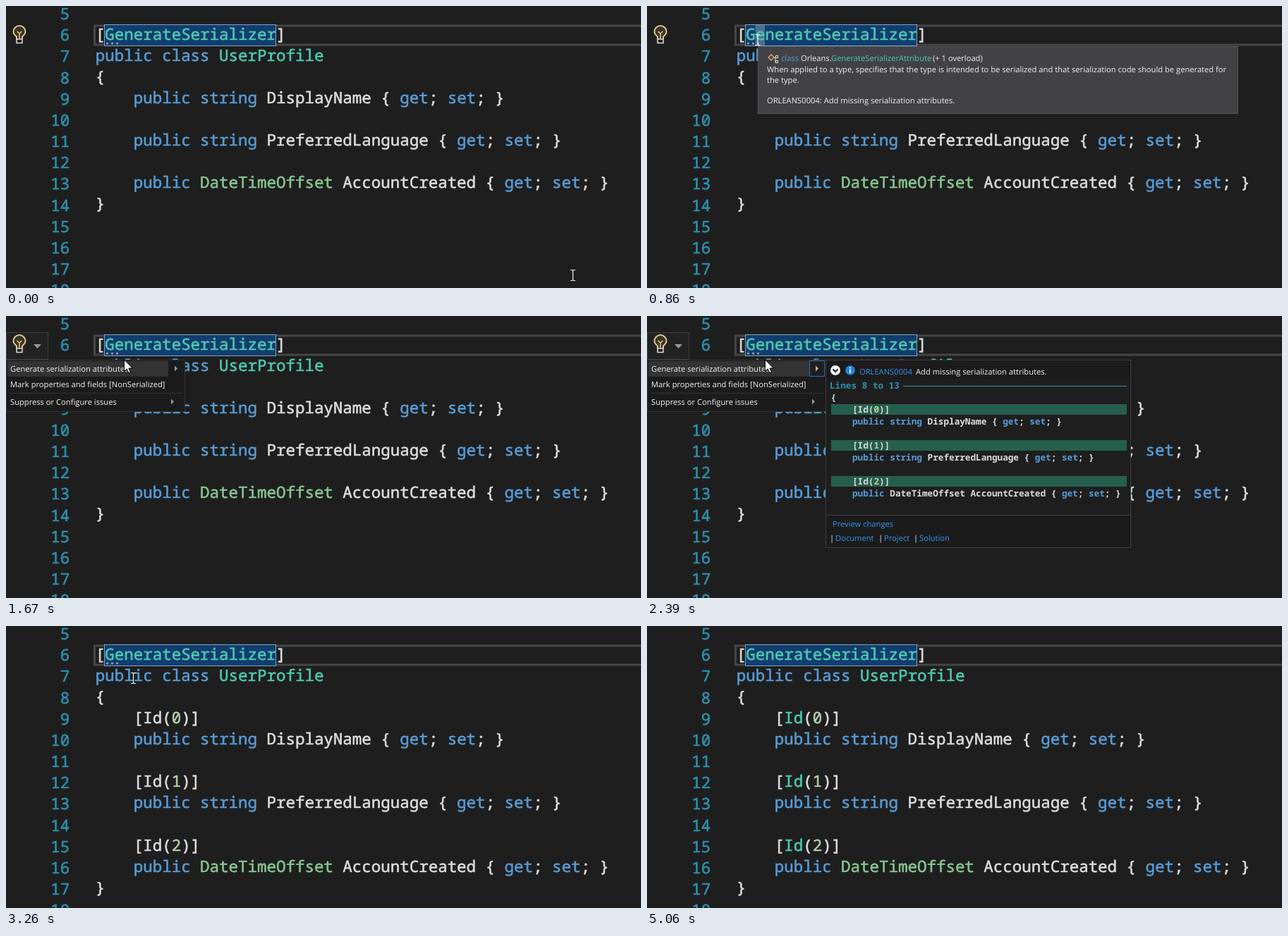
Animation of 900x400 px, one loop 5.13 s. Source, as an HTML page:

```html
<!DOCTYPE html>
<html lang="en">
<head>
<meta charset="utf-8">
<title>Code fix</title>
<style>
html, body { margin: 0; width: 100%; height: 100%; overflow: hidden; background: #1e1e1e; }
svg { display: block; width: 900px; height: 400px; }
text { white-space: pre; text-rendering: geometricPrecision; color: #dcdcdc; }
text, tspan { fill: currentColor; }
.mono { font-family: "Noto Sans Mono", "DejaVu Sans Mono", monospace; font-weight: 500; }
.mono, .mono tspan { stroke: currentColor; stroke-width: .6px; }
.ui { font: 11.18px "Open Sans", "Noto Sans", sans-serif; color: #f1f1f1; }
.key { color: #569cd6; }
.type { color: #4ec9b0; }
.num { color: #b5cea8; }
.id { color: var(--id, #4ec9b0); }
.struct { color: var(--struct, #86c691); }
.line { color: #2b91af; }
.link { color: #2f95ee; }
#preview .mono { font-weight: 600; }
#preview .mono, #preview tspan { stroke: none; }
</style>
</head>
<body>
<svg id="stage" viewBox="0 0 900 400"></svg>
<script>
const FONT = 22.47, LEFT = 126.8, LOOP = 5130;

const plain = `[GenerateSerializer]
public class UserProfile
{
    public string DisplayName { get; set; }

    public string PreferredLanguage { get; set; }

    public DateTimeOffset AccountCreated { get; set; }
}`.split('\n');

// The same class with an [Id(n)] line above each property
let count = 0;
const fixed = plain.flatMap(s => s.startsWith('    ') ? [`    [Id(${count++})]`, s] : [s]);

const kinds = [
  ['key', /^(public|class|string|get|set)$/],
  ['type', /^(GenerateSerializer|UserProfile)$/],
  ['struct', /^DateTimeOffset$/],
  ['id', /^Id$/],
  ['num', /^\d+$/],
];
const paint = s => s.replace(/\w+/g, word => {
  const kind = kinds.find(k => k[1].test(word));
  return kind ? `<tspan class="${kind[0]}">${word}</tspan>` : word;
});

const rect = (x, y, w, h, fill, stroke = 'none') =>
  `<rect x="${x}" y="${y}" width="${w}" height="${h}" fill="${fill}" stroke="${stroke}"/>`;
const path = (d, fill, stroke = 'none', w = 1) =>
  `<path d="${d}" fill="${fill}" stroke="${stroke}" stroke-width="${w}"/>`;
const ui = (x, y, s, cls = '') => `<text class="ui ${cls}" x="${x}" y="${y}">${s}</text>`;
const mono = (x, y, size, s, extra = '') =>
  `<text class="mono" font-size="${size}" x="${x}" y="${y}" ${extra}>${s}</text>`;
const group = (id, body) => `<g id="${id}">${body}</g>`;
const code = lines => lines.map((s, i) => mono(LEFT, 47.6 + 30.1 * i, FONT, paint(s))).join('');

const bulb = (x, y) => `<g transform="translate(${x} ${y})">` +
  path('M-4 8V4.5C-7 2-8.5 0-8.5-2.5A8.5 8.5 0 0 1 8.5-2.5C8.5 0 7 2 4 4.5V8', '#3a3526', '#dcc68a', 2) +
  path('M0 7V0M-3.5-3L0 0L3.5-3', 'none', '#dcc68a', 1.6) +
  path('M-4 8H4V13.5H-4Z', 'none', '#d8d8d8', 1.6) + '</g>';
const bulbButton = (x, y) => rect(x + .5, y + .5, 59, 38, '#222223', '#3f3f46') +
  bulb(x + 19, y + 15) + path(`M${x + 39} ${y + 17}h11l-5.5 6z`, '#999');

const numbers = Array.from({ length: 14 }, (_, i) =>
  mono(90.2, 49.3 + 30.15 * (i - 1), FONT, `<tspan class="line">${i + 5}</tspan>`, 'text-anchor="end"')).join('');

const dots = [143.5, 150.5, 157.5].map(x => `<circle cx="${x}" cy="53" r="1.6" fill="#a0a0a0"/>`).join('');

const tooltip = rect(157.5, 57.5, 680, 95, '#424245', '#555558') +
  path('M172 73l4-4 4 4-4 4zM180 73h5M182 73v6h3', 'none', '#d2b27c', 1.4) +
  rect(182.5, 70.5, 3, 3, '#424245', '#ddd') + rect(182.5, 77.5, 3, 3, '#424245', '#ddd') +
  ui(190, 78, 'class', 'key') + ui(218, 78, 'Orleans.') +
  ui(261, 78, 'GenerateSerializerAttribute', 'type') + ui(405, 78, '(+ 1 overload)') +
  ui(170, 94, 'When applied to a type, specifies that the type is intended to be serialized and that serialization code should be generated for') +
  ui(170, 109, 'the type.') +
  ui(170, 138, 'ORLEANS0004: Add missing serialization attributes.');

const menu = bulbButton(0, 23) + rect(.5, 62.5, 253, 73, '#1b1b1c', '#333337') +
  rect(2, 64, 228, 22, '#333334') +
  ui(6, 79, 'Generate serialization attributes.') +
  ui(6, 101, 'Mark properties and fields [NonSerialized]') +
  ui(6, 126, 'Suppress or Configure issues') +
  path('M6 109.5H250', 'none', '#333337') +
  path('M239 70.5v8l4-4z', '#999') + path('M234 117.5v8l4-4z', '#999');

const preview = rect(230.5, 63.5, 21, 22, '#1f1f20', '#2373b0') + path('M239 70.5v8l4-4z', '#bbb') +
  rect(253.5, 62.5, 432, 266, '#1b1b1c', '#3f3f46') + rect(256, 90, 428, 192, '#1e1e1e') +
  '<circle cx="267" cy="77" r="7" fill="#f1f1f1"/>' + path('M263.5 75.5l3.5 3.5 3.5-3.5', 'none', '#1b1b1c', 2) +
  '<circle cx="288" cy="77" r="6.8" fill="#2186e0"/>' + path('M288 75.5v5.5M288 72.5v1.8', 'none', '#fff', 1.8) +
  ui(301, 82.5, 'ORLEANS0004', 'link') + ui(381, 82.5, 'Add missing serialization attributes.') +
  mono(259, 103, 12.69, '<tspan class="line">Lines 8 to 13</tspan>') + path('M363 99.5H680', 'none', '#2b91af') +
  [125, 176, 227].map(y => rect(261, y, 419, 15, '#265e4d')).join('') +
  fixed.slice(2, -1).map((s, i) => mono(260.5, 119.5 + 17.05 * i, 12.69, paint(s))).join('') +
  path('M254 282.5H685', 'none', '#3f3f46') +
  ui(263, 299, 'Preview changes', 'link') +
  [['Document', 267], ['Project', 336], ['Solution', 386]].map(([s, x]) =>
    ui(x - 8, 319, '|') + ui(x, 319, s, 'link')).join('');

const ibeam = path('M-3.5-7.5h2.5L0-6.5 1-7.5h2.5M-3.5 7.5h2.5L0 6.5 1 7.5h2.5M0-6.5v13', 'none', '#f0f0f0', 1.2);
const arrow = path('M0 0V16.5L3.8 13L6.3 18.8L8.8 17.7L6.4 12H11.8Z', '#fff', '#000');

const stage = document.getElementById('stage');
stage.innerHTML = rect(0, 0, 900, 400, '#1e1e1e') + numbers +
  '<rect x="125.5" y="28" width="790" height="27" fill="none" stroke="#464646" stroke-width="3"/>' +
  group('mark', rect(139.5, 26.5, 243, 30, '#113d6f', '#7fa6c4')) +
  group('caret', rect(153.5, 27, 13.5, 29, 'rgba(255,255,255,.25)')) +
  group('plain', code(plain)) + group('fixed', code(fixed)) + group('dots', dots) +
  group('bulb', bulb(19, 39)) + group('button', bulbButton(0, 23)) + group('moved', bulbButton(2, 58)) +
  group('tooltip', tooltip) + group('menu', menu) + group('preview', preview) +
  group('click', '<circle cx="157" cy="48" r="12" fill="#cfc330" fill-opacity=".78"/>') +
  group('ibeam', ibeam) + group('arrow', arrow);

const el = id => document.getElementById(id);

// Spans of time, in ms, in which each part is visible
const spans = {
  mark: [[0, 4190], [4730, LOOP]],
  caret: [[800, 1330], [3790, 4330], [4860, 5060]],
  plain: [[0, 3190]],
  fixed: [[3190, LOOP]],
  dots: [[0, 4330]],
  bulb: [[0, 1390]],
  button: [[1530, 1670]],
  moved: [[3060, 3130]],
  tooltip: [[860, 1600]],
  menu: [[1670, 3060]],
  preview: [[2390, 3060]],
  click: [[730, 860]],
  ibeam: [[0, 1330], [3260, 4860]],
  arrow: [[1330, 3260]],
};

const mix = (a, b, p) => a.map((v, i) => v + (b[i] - v) * p);
const clamp = p => Math.max(0, Math.min(1, p));
const ease = p => (1 - Math.cos(Math.PI * p)) / 2;

function pointer(t) {
  const step = Math.floor((t + 4) * 15 / 1000); // the screen was sampled 15 times a second
  if (t < 597) return mix([803.5, 382], [182, 45], ease(clamp(step / 8)));
  if (t < 1330) return mix([182, 45], [157, 48], clamp((step - 8) / 2));
  if (t < 3260) return [167.5, 62];
  return mix([180.5, 74], [1242, 552], clamp((step - 70) / 3));
}

function draw(now) {
  const t = now % LOOP;
  for (const id in spans)
    el(id).style.display = spans[id].some(([a, b]) => t >= a && t < b) ? '' : 'none';
  const [x, y] = pointer(t);
  for (const id of ['ibeam', 'arrow']) el(id).setAttribute('transform', `translate(${x} ${y})`);
  el('fixed').style.setProperty('--id', t < 4330 ? '#dcdcdc' : '#4ec9b0');
  el('preview').style.setProperty('--id', t < 2530 ? '#dcdcdc' : '#4ec9b0');
  el('preview').style.setProperty('--struct', t < 2530 ? '#dcdcdc' : '#86c691');
}

const start = performance.now();
function tick() {
  draw(performance.now() - start);
  requestAnimationFrame(tick);
}
tick();
</script>
</body>
</html>
```
